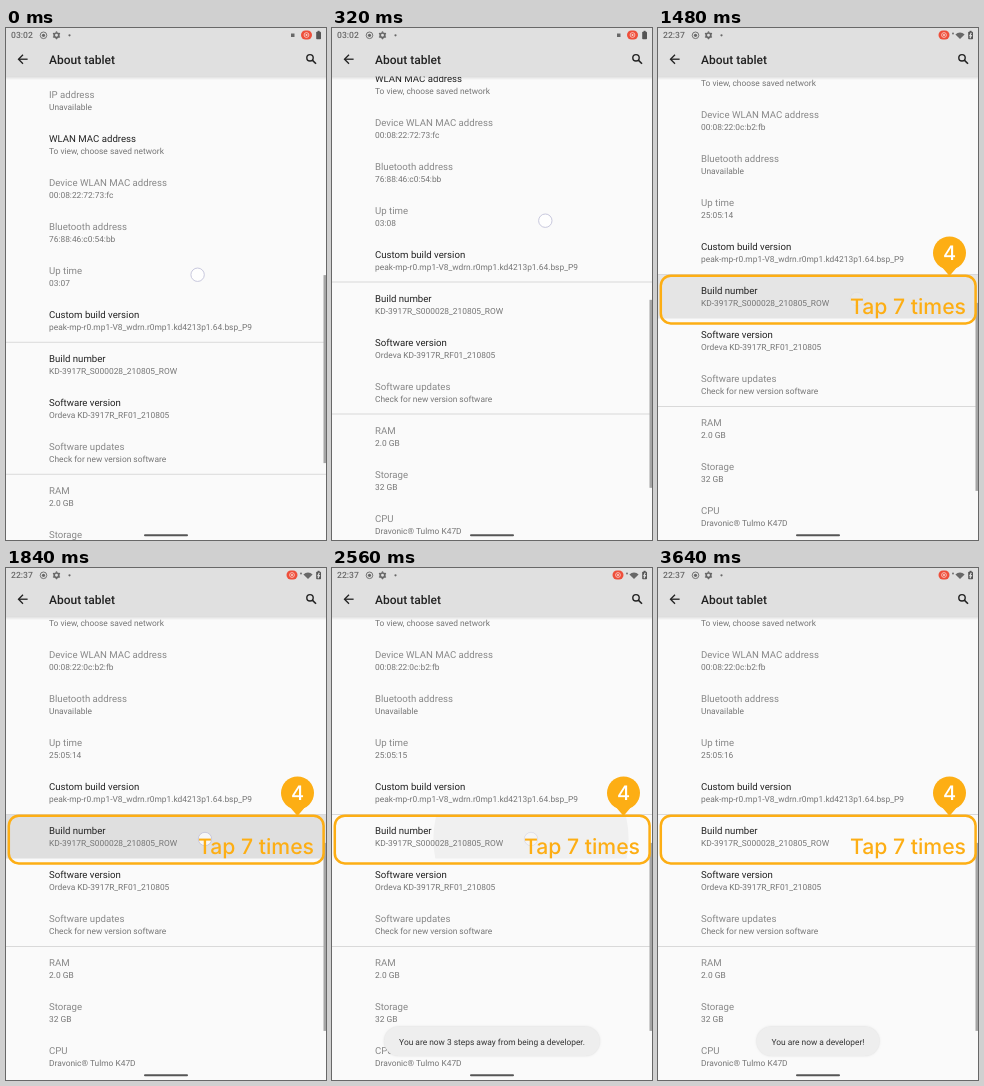
An HTML page with a canvas that plays this animation: 320 px wide and 512 px high, repeating every 3.8 s.

```html
<!DOCTYPE html>
<html lang="en">
<head>
<meta charset="utf-8">
<title>About tablet</title>
<style>
  html, body { margin: 0; width: 320px; height: 512px; overflow: hidden; background: #fafafa; }
  canvas { display: block; }
</style>
</head>
<body>
<canvas id="stage" width="320" height="512"></canvas>
<script>
const ctx = document.getElementById('stage').getContext('2d');
ctx.textRendering = 'geometricPrecision';
const LOOP = 3800, CUT = 800, CALLOUT_AT = 1280;
const ORANGE = '#fdae14', STATUS = '#686868';
const TOUCH = { x: 199, y: 271 };
const ROW_TOP = 247, ROW_HEIGHT = 43.5;

// Press and release times of the seven taps.
const taps = [[1260, 1400], [1460, 1580], [1640, 1860], [2120, 2260],
              [2500, 2640], [2800, 2900], [3240, 3420]];
const away = n => `You are now ${n} step${n > 1 ? 's' : ''} away from being a developer.`;
const toasts = [4, 3, 2, 1, 0].map((left, i) => ({
  start: taps[i + 2][1] + 20,
  message: left ? away(left) : 'You are now a developer!'
}));

const clamp = v => Math.max(0, Math.min(1, v));

function text(str, x, y, font, color, align = 'left') {
  ctx.font = font;
  ctx.fillStyle = color;
  ctx.textAlign = align;
  ctx.fillText(str, x, y);
}

function box(x, y, w, h, r, color) {
  ctx.fillStyle = color;
  ctx.beginPath();
  ctx.roundRect(x, y, w, h, r);
  ctx.fill();
}

function disc(x, y, r, color) {
  ctx.fillStyle = color;
  ctx.beginPath();
  ctx.arc(x, y, r, 0, 7);
  ctx.fill();
}

function ring(x, y, r, color, width) {
  ctx.strokeStyle = color;
  ctx.lineWidth = width;
  ctx.beginPath();
  ctx.arc(x, y, r, 0, 7);
  ctx.stroke();
}

function line(color, width, ...points) {
  ctx.strokeStyle = color;
  ctx.lineWidth = width;
  ctx.beginPath();
  points.forEach(p => ctx.lineTo(...p));
  ctx.stroke();
}

function withAlpha(alpha, draw) {
  ctx.save();
  ctx.globalAlpha = alpha;
  draw();
  ctx.restore();
}

// Each row: title, summary, enabled.
function rows(t) {
  const second = t >= CUT;
  const upTime = second ? '25:05:' + (t < 1900 ? 14 : t < 2860 ? 15 : 16)
                        : t < 200 ? '03:07' : '03:08';
  return [
    ['IP address', 'Unavailable'],
    ['WLAN MAC address', 'To view, choose saved network', true],
    ['Device WLAN MAC address', second ? '00:08:22:0c:b2:fb' : '00:08:22:72:73:fc'],
    ['Bluetooth address', second ? 'Unavailable' : '76:88:46:c0:54:bb'],
    ['Up time', upTime],
    ['Custom build version', 'peak-mp-r0.mp1-V8_wdrn.r0mp1.kd4213p1.64.bsp_P9', true],
    ['Build number', 'KD-3917R_S000028_210805_ROW', true],
    ['Software version', 'Ordeva KD-3917R_RF01_210805', true],
    ['Software updates', 'Check for new version software'],
    ['RAM', '2.0 GB'],
    ['Storage', '32 GB'],
    ['CPU', 'Dravonic® Tulmo K47D']
  ];
}

function drawList(t, scroll) {
  rows(t).forEach(([title, summary, enabled], i) => {
    const y = 70.3 + 44 * i - scroll;
    text(title, 43, y, '9.65px Roboto, sans-serif', enabled ? '#222' : '#888');
    text(summary, 43, y + 12, '8.4px Roboto, sans-serif', '#757575');
  });
  for (const y of [314, 446]) box(0, y - scroll, 320, 1, 0, '#d9d9d9');
  box(317.5, 247 + scroll * 0.41, 2.5, 188, 0, '#a5a5a5');
}

function drawRipples(t) {
  ctx.save();
  ctx.beginPath();
  ctx.rect(0, ROW_TOP, 320, ROW_HEIGHT);
  ctx.clip();
  for (const [press, release] of taps) {
    const age = t - press;
    if (age < 0) continue;
    const alpha = 0.11 * clamp((age - 25) / 100) * (1 - clamp((t - release - 40) / 180));
    disc(TOUCH.x, TOUCH.y, 44 + 0.88 * age, `rgba(0,0,0,${alpha})`);
  }
  ctx.restore();
}

function drawFinger(x, y, alpha) {
  withAlpha(alpha, () => {
    disc(x, y, 6.5, 'rgba(255,255,255,.75)');
    ring(x, y, 6.7, '#c9c9de', 1);
  });
}

function drawFingers(t, eased) {
  if (t < 440) drawFinger(191.5 + 24.5 * eased, 247 - 61 * eased, 1);
  for (const [press, release] of taps)
    if (t >= press && t < release) drawFinger(TOUCH.x, TOUCH.y, clamp((t - press) / 140));
}

function drawWifi(x, y) {
  ctx.fillStyle = STATUS;
  ctx.beginPath();
  ctx.moveTo(x, y + 4);
  ctx.arc(x, y + 4, 6.5, -Math.PI * 0.75, -Math.PI * 0.25);
  ctx.fill();
}

function drawStatusBar(second) {
  text(second ? '22:37' : '03:02', 5, 10.4, '500 8.6px Roboto, sans-serif', STATUS);
  ring(37.5, 7.3, 3.3, STATUS, 0.9);
  disc(37.5, 7.3, 1.6, STATUS);
  ring(50.5, 7.3, 2.3, STATUS, 1.7);
  for (let i = 0; i < 6; i++) {
    const a = i * Math.PI / 3 + Math.PI / 6;
    disc(50.5 + 3.3 * Math.cos(a), 7.3 + 3.3 * Math.sin(a), 0.8, STATUS);
  }
  disc(63.5, 7.3, 1.1, STATUS);

  const castX = second ? 286 : 300.5;
  box(castX - 5.5, 2.5, 11, 9, 4.5, '#ee4f3b');
  ring(castX, 7, 2.4, '#fbd5cf', 0.8);
  disc(castX, 7, 1, '#fbd5cf');
  if (second) {
    disc(295, 5.5, 0.9, STATUS);
    drawWifi(302, 7);
  } else {
    box(285, 5.5, 3.5, 3.5, 0, STATUS);
  }
  box(310.2, 3.8, 4.8, 7.4, 0.8, '#555');
  box(311.6, 2.8, 2, 1.2, 0, '#555');
  if (second) line('#e0e0e0', 1.2, [313.3, 4.8], [311.9, 7.6], [313.3, 7.6], [312, 10.2]);
}

function drawHeader(second) {
  const shadow = ctx.createLinearGradient(0, 48, 0, 52);
  shadow.addColorStop(0, 'rgba(0,0,0,.13)');
  shadow.addColorStop(1, 'rgba(0,0,0,0)');
  box(0, 48, 320, 4, 0, shadow);
  box(0, 0, 320, 48.5, 0, '#e0e0e0');
  drawStatusBar(second);
  line('#222', 1.3, [21.6, 31.2], [12.8, 31.2]);
  line('#222', 1.3, [17, 26.7], [12.5, 31.2], [17, 35.7]);
  text('About tablet', 43, 35.5, '500 12px Roboto, sans-serif', '#222');
  ring(304, 29.8, 3.2, '#222', 1.4);
  line('#222', 1.6, [306.3, 32.1], [310, 35.8]);
}

function drawCallout() {
  ctx.strokeStyle = ORANGE;
  ctx.lineWidth = 2.5;
  ctx.beginPath();
  ctx.roundRect(2.8, 247.8, 314.8, 47.6, 10);
  ctx.stroke();
  disc(291.5, 225, 16.5, ORANGE);
  ctx.beginPath();
  ctx.moveTo(283, 238);
  ctx.lineTo(291.5, 248);
  ctx.lineTo(300, 238);
  ctx.fill();
  text('4', 291.5, 232, '500 20px Inter, sans-serif', '#fff', 'center');
  text('Tap 7 times', 250, 285.6, '500 21.2px Inter, sans-serif', ORANGE, 'center');
}

function drawToast(message, alpha) {
  withAlpha(alpha, () => {
    const font = '8.4px Roboto, sans-serif';
    ctx.font = font;
    const w = ctx.measureText(message).width + 30;
    ctx.shadowColor = 'rgba(0,0,0,.12)';
    ctx.shadowBlur = 2;
    box(160 - w / 2, 458.5, w, 29.5, 14.7, '#eee');
    ctx.shadowColor = 'transparent';
    text(message, 160, 476.6, font, '#333', 'center');
  });
}

function drawToasts(t) {
  const current = toasts.findLastIndex(toast => t >= toast.start);
  if (current < 0) return;
  const fade = clamp((t - toasts[current].start) / 100);
  if (current > 0 && fade < 1) drawToast(toasts[current - 1].message, 1);
  drawToast(toasts[current].message, fade);
}

function render(t) {
  const second = t >= CUT;
  const eased = 1 - (1 - clamp(t / 480)) ** 2;
  box(0, 0, 320, 512, 0, '#fafafa');
  drawRipples(t);
  drawList(t, 68 * eased);
  drawFingers(t, eased);
  drawHeader(second);
  if (t >= CALLOUT_AT) drawCallout();
  drawToasts(t);
  box(138, 506.2, 44, 2, 1, '#555');
}

const start = performance.now();
function frame() {
  render((performance.now() - start) % LOOP);
  requestAnimationFrame(frame);
}
frame();
</script>
</body>
</html>
```
